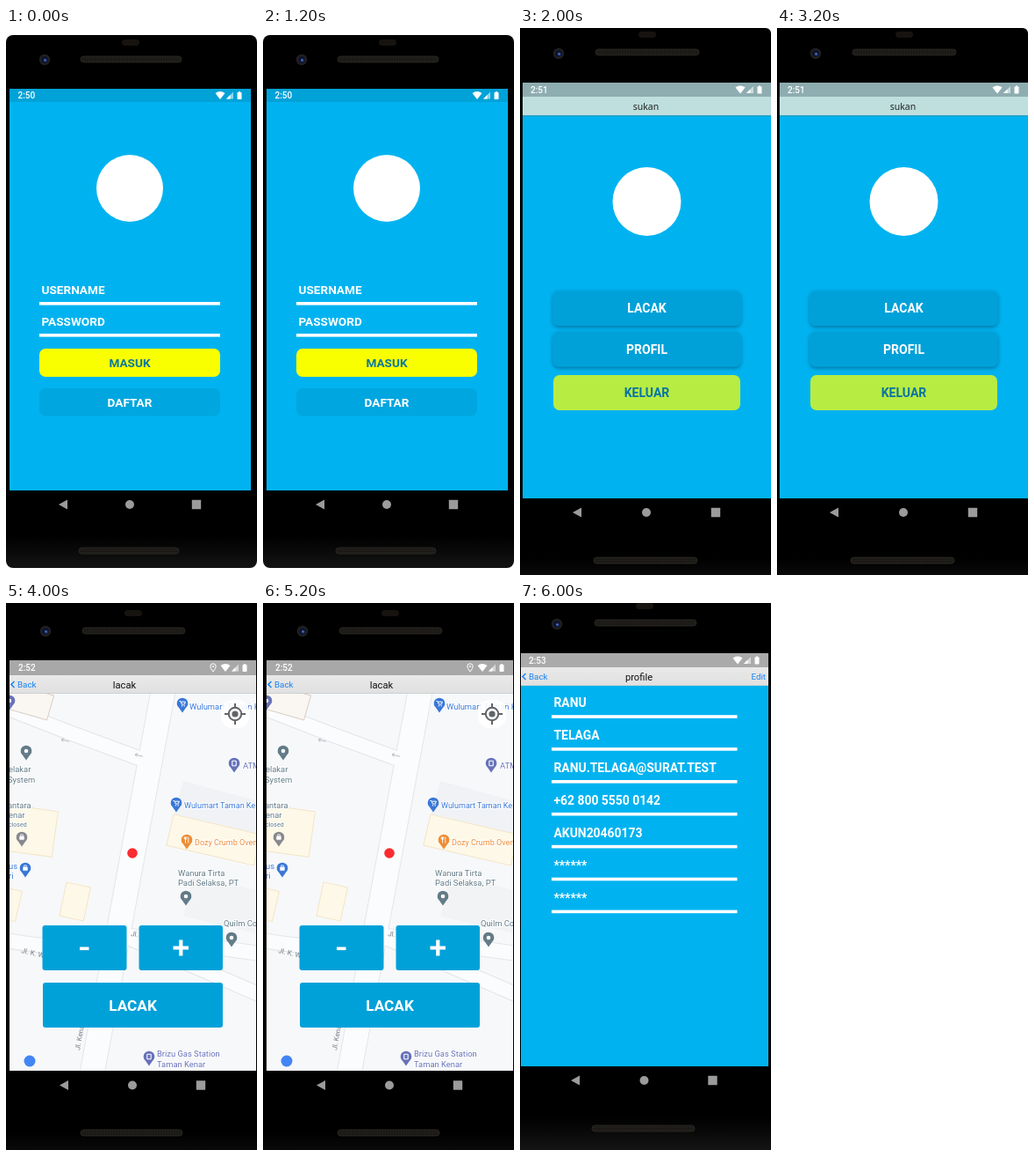
An HTML page for the animation above (8 s loop, 286x621 px).

```html
<!DOCTYPE html>
<html lang="id">
<head>
<meta charset="utf-8">
<style>
html, body { margin: 0; width: 100%; height: 100%; overflow: hidden; background: #fff; }
svg { display: block; width: 286px; height: 621px; font-family: Roboto, "Noto Sans", sans-serif; }
</style>
</head>
<body>
<svg id="stage" viewBox="0 0 286 621">
  <defs>
    <linearGradient id="bar" x1="0" y1="0" x2="0" y2="1">
      <stop offset="0" stop-color="#e9e9e9"/><stop offset="1" stop-color="#e0e0e0"/>
    </linearGradient>
    <linearGradient id="body" x1="0" y1="0" x2="0" y2="1">
      <stop offset=".94" stop-color="#000"/><stop offset="1" stop-color="#141414"/>
    </linearGradient>
    <pattern id="mesh" width="3" height="3" patternUnits="userSpaceOnUse">
      <rect width="3" height="3" fill="#1b1916"/><circle cx="1.5" cy="1.5" r=".8" fill="#282521"/>
    </pattern>
    <filter id="soft" x="-10%" y="-30%" width="120%" height="170%">
      <feDropShadow dx="0" dy="2" stdDeviation="2" flood-color="#00496b" flood-opacity=".55"/>
    </filter>
    <clipPath id="mapArea"><rect x="4" y="102" width="281" height="429"/></clipPath>
  </defs>
</svg>
<script>
const SKY = '#00b3f0', BUTTON = '#00a1d9', LINK = '#1683f5';
const LOOP = 8000, HOLD = 2000;

const rect = (x, y, w, h, fill, r = 0, more = '') =>
  `<rect x="${x}" y="${y}" width="${w}" height="${h}" rx="${r}" fill="${fill}" ${more}/>`;
const circle = (x, y, r, fill, more = '') =>
  `<circle cx="${x}" cy="${y}" r="${r}" fill="${fill}" ${more}/>`;
const path = (d, fill, more = '') => `<path d="${d}" fill="${fill}" ${more}/>`;
const text = (x, y, s, size, fill, more = '') =>
  `<text x="${x}" y="${y}" font-size="${size}" fill="${fill}" ${more}>${s}</text>`;
const mid = 'text-anchor="middle"', bold = 'font-weight="700"';
const at = (x, y, body, turn = 0) =>
  `<g transform="translate(${x} ${y}) rotate(${turn})">${body}</g>`;

function speaker(x, y, w) {
  return rect(x, y, w, 7, 'url(#mesh)', 3.5, 'stroke="#2e2b28" stroke-width=".8"');
}

// Phone body, empty screen and navigation keys
function phone(p) {
  const [cx, cy] = p.cam, [sx, sy, sw, sh] = p.screen, [back, home, recent] = p.keys, k = p.keyY;
  const [x, y, w, h, r] = p.body;
  return rect(x, y, w, h, 'url(#body)', r) +
    rect(p.sensor[0], p.sensor[1], 20, 7, '#17130f', 3.5) +
    circle(cx, cy, 6.2, '#202023') + circle(cx, cy, 4, '#10152a') +
    circle(cx + .8, cy + .8, 1.8, '#24489b') + circle(cx + .3, cy + .3, .7, '#7f9bd8') +
    speaker(...p.ear) + speaker(...p.mouth) +
    rect(sx, sy, sw, sh, p.fill) +
    path(`M${back - 5} ${k}l10-5.5v11z`, '#9b9b9b') +
    circle(home, k, 5, '#9b9b9b') +
    rect(recent - 5.2, k - 5.2, 10.4, 10.4, '#9b9b9b', .5);
}

function status(x, y, w, h, fill, time, timeX, wifi, located) {
  const c = y + h / 2, f = '#fff';
  return rect(x, y, w, h, fill) +
    text(timeX, c + 3.8, time, 10, f, 'font-weight="500"') +
    (located ? path(`M${wifi - 14} ${c + 4.5}q-3.2-4-3.2-6a3.2 3.2 0 0 1 6.4 0q0 2-3.2 6z`,
      'none', 'stroke="#fff" stroke-width="1"') + circle(wifi - 14, c - 1.5, 1, f) : '') +
    path(`M${wifi - 5.5} ${c - 2.5}q5.5-4 11 0l-5.5 7z`, f) +
    path(`M${wifi + 7} ${c + 4}l8-8v8z`, f, 'opacity=".55"') +
    path(`M${wifi + 7} ${c + 4}l4.5-4.5v4.5z`, f) +
    rect(wifi + 19.5, c - 3.5, 5, 8, f, .8) + rect(wifi + 21, c - 4.5, 2, 2, f);
}

function header(x, y, w, h, title, centre) {
  const m = y + 10.5;
  return rect(x, y, w, h, 'url(#bar)') +
    rect(x, y + h - .8, w, .8, '#c6cdd0') +
    path(`M${x + 5.5} ${m - 3.5}l-3.5 3.5 3.5 3.5`, 'none', `stroke="${LINK}" stroke-width="1.5"`) +
    text(x + 9, m + 3.4, 'Back', 9.8, LINK) +
    text(centre, m + 4, title, 11.2, '#111', mid);
}

function button(x, y, w, h, label, fill, ink, size, r, more) {
  return rect(x, y, w, h, fill, r, more) +
    text(x + w / 2, y + h / 2 + size * .36, label, size, ink, `${mid} ${bold}`);
}

function field(x, y, w, label, size, baseline) {
  return text(x + 2.5, baseline, label, size, '#fff', bold) + rect(x, y, w, 3.6, '#fff');
}

function login() {
  return phone({ body: [0, 8, 286, 605, 8], cam: [44, 36], sensor: [132, 13],
      ear: [85, 32, 115], mouth: [83, 590, 114], screen: [4, 69, 275, 456], fill: SKY,
      keys: [65, 141, 217], keyY: 541 }) +
    status(4, 69, 275, 15, '#00a2d7', '2:50', 13.5, 244) +
    circle(141, 182, 38, '#fff') +
    field(38, 311, 206, 'USERNAME', 13.6, 301.6) +
    field(38, 347, 206, 'PASSWORD', 13.6, 337.5) +
    button(38, 364, 206, 32, 'MASUK', '#faff00', '#08789f', 13.6, 7) +
    button(38, 409, 206, 31.5, 'DAFTAR', '#00a6df', '#fff', 13.6, 7);
}

function menu() {
  return phone({ body: [-8, 0, 294, 640, 6], cam: [44, 29], sensor: [135, 4],
      ear: [86, 24, 118], mouth: [84, 601, 118], screen: [3, 62, 283, 472], fill: SKY,
      keys: [65, 144, 223], keyY: 550 }) +
    status(3, 62, 283, 16, '#8eadb0', '2:51', 12, 251) +
    rect(3, 78, 283, 21, '#bfdfdf') + rect(3, 99, 283, 1.4, '#2a9fc4') +
    text(143.5, 92.5, 'sukan', 10.5, '#222', `${mid} font-family="Noto Sans, sans-serif"`) +
    circle(144.5, 197, 39, '#fff') +
    button(37, 298, 215, 40, 'LACAK', BUTTON, '#fff', 14, 7, 'filter="url(#soft)"') +
    button(37, 344.5, 215, 40, 'PROFIL', BUTTON, '#fff', 14, 7, 'filter="url(#soft)"') +
    button(38, 394, 213, 40, 'KELUAR', '#b7ec42', '#0873a6', 14, 7);
}

const glyphs = {
  cart: path('M-3.5-2.5h1.5l1.2 3.5h3.2l1-2.8h-4.6', 'none', 'stroke="#fff" stroke-width="1"') +
    circle(-.5, 2.7, .7, '#fff') + circle(2.2, 2.7, .7, '#fff'),
  food: path('M-1.5-3.5v7M1.8-3.5v7M-2.7-3.5v2.5h2.4v-2.5', 'none', 'stroke="#fff" stroke-width=".9"'),
  bag: rect(-2.7, -1.5, 5.4, 4.2, '#fff', .5) +
    path('M-1.3-1.5v-1.6h2.6v1.6', 'none', 'stroke="#fff" stroke-width=".8"'),
  box: rect(-2.2, -2.8, 4.4, 5.6, 'none', .5, 'stroke="#fff" stroke-width="1.1"'),
  dot: circle(0, 0, 2.3, '#fff')
};

function pin(x, y, fill, glyph = 'dot') {
  return at(x, y, path('M0 10.5C-1-.5 0 6-5 3.8A6.3 6.3 0 1 1 5 3.8C0 6 1-.5 0 10.5z', fill) +
    path('M-4.6 4L0 10.5 4.6 4z', fill) + glyphs[glyph]);
}

function streets() {
  const roads = ['M180 95L97 540', 'M0 119L75 148 162 180', 'M0 383Q90 400 128 376L290 398',
    'M130 376L290 445'];
  const lay = (c, trim) => roads.map((d, i) =>
    path(d, 'none', `stroke="${c}" stroke-width="${(i ? 18 : 29) - trim}"`)).join('');
  const arrow = (x, y, turn) => at(x, y,
    path('M5 0h-9m2.5-2l-2.5 2 2.5 2', 'none', 'stroke="#b7bcc0" stroke-width=".9"'), turn);
  return lay('#e2e6ea', 0) + lay('#fbfcfd', 2) + arrow(67, 156, 14) + arrow(151, 173, 14);
}

function places() {
  const blue = '#3977d7', violet = '#6671b9', slate = '#627b87', orange = '#ee8c35', s = 9.4;
  const label = (x, y, word, fill, size = s) => text(x, y, word, size, fill,
    'stroke="#fff" stroke-width="2" paint-order="stroke" stroke-linejoin="round"');
  return pin(4, 111, violet) + pin(201, 114, blue, 'cart') +
    label(209, 121, 'Wulumart Taman Kenar', blue) +
    pin(260, 182, violet, 'box') + label(270, 188, 'ATM', violet) +
    pin(194, 227, blue, 'cart') + label(203, 233, 'Wulumart Taman Kenar', blue, 9) +
    pin(206, 269, orange, 'food') + label(215, 275, 'Dozy Crumb Oven', orange, 9) +
    label(196, 310, 'Wanura Tirta', slate) + label(196, 320.5, 'Padi Selaksa, PT', slate) +
    pin(205, 333, slate) +
    label(248, 367, 'Quilm Co', slate) + pin(257, 380, slate) +
    pin(23, 168, slate) + label(3, 192, 'elakar', slate) + label(2, 204, 'System', slate) +
    label(2, 233, 'antara', slate) + label(3, 244, 'enar', slate) +
    label(3, 253.5, 'closed', slate, 7) + pin(18, 266, '#85898e', 'bag') +
    label(3, 302, 'us', blue) + label(3, 313, 'ri', blue) + pin(22, 301, blue, 'bag') +
    pin(163, 515, violet, 'box') +
    label(172, 515, 'Brizu Gas Station', violet) + label(172, 526.5, 'Taman Kenar', violet);
}

function map() {
  const cream = '#fef8e8', edge = 'stroke="#f3e5c6" stroke-width="1"';
  const block = (x, y, w, h, turn, fill, more) => at(x, y, rect(0, 0, w, h, fill, 0, more), turn);
  const road = (x, y, s, turn) => at(x, y, text(0, 0, s, 8, '#777f86'), turn);
  const cross = path('M0-12v5M0 7v5M-12 0h5M7 0h5', 'none', 'stroke="#606468" stroke-width="2"') +
    circle(0, 0, 7.2, 'none', 'stroke="#606468" stroke-width="2"') + circle(0, 0, 3.6, '#606468');
  return '<g clip-path="url(#mapArea)">' +
    rect(4, 102, 281, 429, '#f7f8fa') +
    block(202, 202, 100, 55, 15, '#f0f2f5') + block(213, 309, 90, 48, 13, '#f1f3f5') +
    streets() +
    block(-5, 88, 62, 29, 16, '#faf6f1', 'stroke="#d8cec6" stroke-width="1"') +
    block(-4, 228, 64, 52, 8, cream, edge) + block(191, 240, 102, 36, 13, cream, edge) +
    block(69, 317, 28, 39, 12, cream, edge) + block(-5, 322, 24, 35, 13, cream, edge) +
    road(17, 397, 'Jl. K. Wulan', 13) + road(142, 378, 'Jl. K. Wulan', 8) +
    road(84, 508, 'Jl. Kenar', -80) +
    places() + circle(144, 284, 5.8, '#fb2b2f') +
    rect(245, 110, 32, 32, '#fff', 13, 'opacity=".9"') + at(261, 126, cross) +
    circle(27, 520, 6.5, '#4285f4') + '</g>';
}

function track() {
  return phone({ body: [0, 0, 286, 640, 0], cam: [45, 32], sensor: [135, 8],
      ear: [87, 28, 117], mouth: [85, 598, 116], screen: [4, 65, 281, 466], fill: '#f7f8fa',
      keys: [66, 144, 222], keyY: 547.5 }) +
    map() +
    status(4, 65, 281, 17, '#a8a8a8', '2:52', 14, 250, true) +
    header(4, 82, 281, 21, 'lacak', 135) +
    rect(41.5, 366, 96, 51, BUTTON, 3) + rect(151.5, 366, 95.5, 51, BUTTON, 3) +
    rect(84, 390.5, 10.5, 3.6, '#fff') +
    path('M190.5 391.5h17.5M199.3 382.5v18', 'none', 'stroke="#fff" stroke-width="4.2"') +
    button(42, 431, 205, 51, 'LACAK', BUTTON, '#fff', 17.2, 3);
}

function profile() {
  const rows = ['RANU', 'TELAGA', 'RANU.TELAGA@SURAT.TEST', '+62 800 5550 0142',
    'AKUN20460173', '******', '******'];
  return phone({ body: [0, 0, 286, 621, 0], cam: [42, 24], sensor: [132, 0],
      ear: [85, 19, 116], mouth: [82, 593, 117], screen: [1, 57, 282, 469], fill: SKY,
      keys: [63, 141.5, 219.5], keyY: 542 }) +
    status(1, 57, 282, 16, '#aaa', '2:53', 10, 248) +
    header(1, 73, 282, 21, 'profile', 135.5) +
    text(280, 87, 'Edit', 9.8, LINK, 'text-anchor="end"') +
    rows.map((s, i) => field(36, 127.2 + i * 36.9, 211.5, s, 13.9, 117.5 + i * 37)).join('');
}

const stage = document.getElementById('stage');
const scenes = [login, menu, track, profile].map(draw => {
  const g = document.createElementNS('http://www.w3.org/2000/svg', 'g');
  g.innerHTML = draw();
  stage.append(g);
  return g;
});

function render(ms) {
  const current = Math.floor(ms % LOOP / HOLD);
  scenes.forEach((g, i) => g.setAttribute('display', i === current ? 'inline' : 'none'));
}

const start = performance.now();
function tick() {
  render(performance.now() - start);
  requestAnimationFrame(tick);
}
tick();
</script>
</body>
</html>
```
